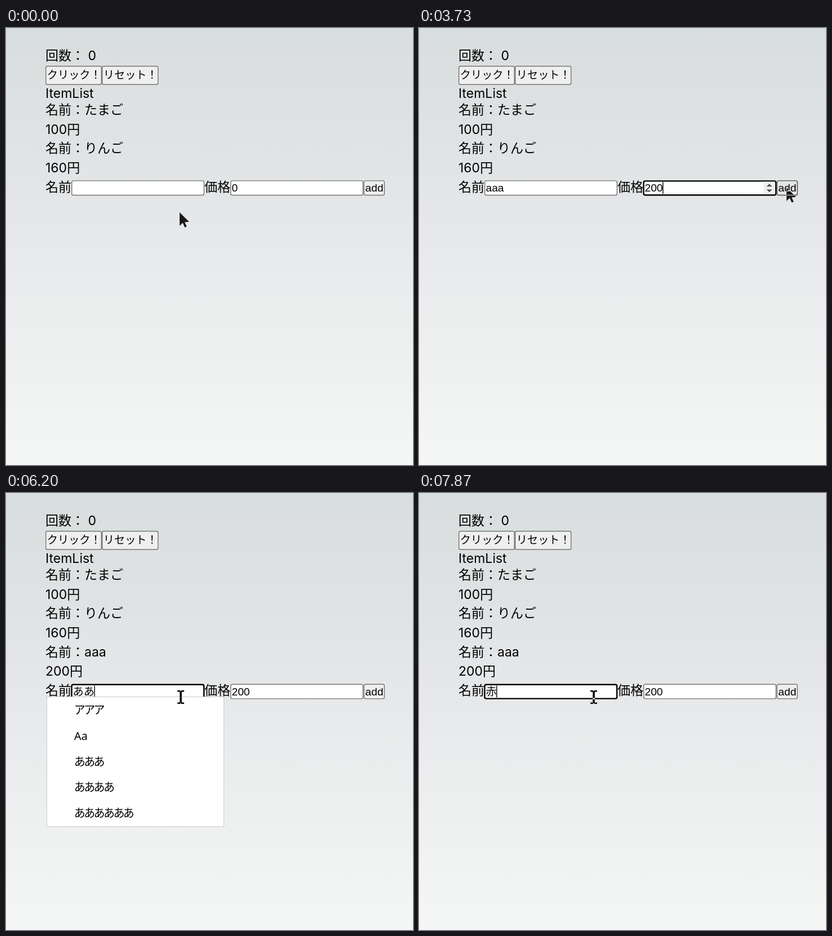
Write an HTML page with a canvas that moves like this. It is 722x775 px and loops after 8 s.

```html
<!DOCTYPE html>
<html lang="ja">
<head>
<meta charset="utf-8">
<title>ItemList</title>
<style>
  html, body { margin: 0; width: 100%; height: 100%; overflow: hidden; }
  canvas { display: block; }
</style>
</head>
<body>
<canvas id="stage" width="722" height="775"></canvas>
<script>
const ctx = document.getElementById('stage').getContext('2d');
const LOOP = 8000, STEP = 1000 / 15;
const KANA = "'Noto Sans CJK JP DemiLight', 'Noto Sans CJK JP Light', 'Noto Sans CJK JP', 'Noto Sans CJK', sans-serif";
const PAGE_FONT = "23px Inter, " + KANA;
const FIELD_FONT = "19.2px 'Liberation Sans', " + KANA;
const MENU_FONT = "20px 'Noto Sans', " + KANA;

// Pointer hot spot: time, x, y
const path = [
  [0, 308, 327], [133, 300, 321], [333, 252, 294], [533, 236, 282],
  [3133, 236, 282], [3267, 256, 290], [3400, 400, 306], [3533, 570, 300], [3733, 652, 283],
  [4200, 652, 283], [4333, 590, 300], [4533, 367, 337], [4667, 322, 354], [4800, 310, 362],
  [LOOP, 310, 362]
];

const nameText = [
  [0, ''], [1600, 'a'], [1730, 'aa'], [1930, 'aaa'], [6000, 'あ'], [6130, 'ああ'],
  [6330, 'あああ'], [6730, 'ああ'], [6800, 'あ'], [7070, 'あｋ'], [7130, 'あか'], [7330, '赤']
];
const priceText = [[0, '0'], [2470, '2'], [2530, '20'], [2670, '200']];
const focus = [[0, ''], [930, 'name'], [2130, 'price'], [3930, ''], [5000, 'name']];
const selected = [[0, false], [2130, true], [2470, false], [5470, true], [6000, false]];
const caretOn = [
  [0, true], [1470, false], [1600, true], [3200, false], [3730, true], [6730, false], [6800, true]
];
const underline = [[0, ''], [6000, 'wave'], [7330, 'bar'], [7870, '']];

const kanaMenu = { right: 387, items: ['アアア', 'Aa', 'あああ', 'ああああ', 'ああああああ'] };
const shortMenu = { right: 395, items: ['ありがとうございます', 'あ', 'ある', 'あと', 'あり'] };
const redMenu = { right: 395, items: ['赤', '明るい', '赤い', 'あかり', 'アカ'] };
const menu = [[0, null], [6200, kanaMenu], [6800, shortMenu], [7200, redMenu], [7330, null]];

const at = (list, t) => list.findLast(entry => entry[0] <= t)[1];

function pointerAt(t) {
  const time = Math.floor((t + 4) / STEP) * STEP;
  const i = Math.max(1, path.findIndex(p => p[0] > time));
  const [a, b] = [path[i - 1], path[i]];
  const k = (time - a[0]) / (b[0] - a[0]);
  return [a[1] + (b[1] - a[1]) * k, a[2] + (b[2] - a[2]) * k];
}

function text(str, x, y, font, color = '#000') {
  ctx.font = font;
  ctx.fillStyle = color;
  ctx.fillText(str, x, y);
}

function rect(x, y, w, h, color) {
  ctx.fillStyle = color;
  ctx.fillRect(x, y, w, h);
}

function box(x, y, w, h, fill, border, line) {
  ctx.beginPath();
  ctx.roundRect(x + line / 2, y + line / 2, w - line, h - line, 2.8);
  ctx.fillStyle = fill;
  ctx.fill();
  ctx.strokeStyle = border;
  ctx.lineWidth = line;
  ctx.stroke();
}

function polygon(points, x, y, scale) {
  ctx.beginPath();
  for (const [px, py] of points) ctx.lineTo(x + px * scale, y + py * scale);
  ctx.fill();
}

const inside = ([px, py], x, y, w, h) => px >= x && px < x + w && py >= y && py < y + h;

function button(label, x, y, w, h, base, fill = '#efefef', border = '#767676') {
  box(x, y, w, h, fill, border, 1.4);
  text(label, x + 2.8, base, FIELD_FONT);
}

function spinner(x, y) {
  rect(x, y + 2.5, 20, 21.5, '#efefef');
  ctx.fillStyle = '#505050';
  polygon([[-5, 0], [0, -5], [5, 0]], x + 10.5, y + 11, 1);
  polygon([[-5, 0], [0, 5], [5, 0]], x + 10.5, y + 16, 1);
}

function field(x, y, value, focused, hovered, t) {
  if (focused) box(x - 0.7, y, 237, 27.2, '#fff', '#000', 2.4);
  else box(x, y, 236, 27, '#fff', hovered ? '#4f4f4f' : '#767676', 1.4);
  ctx.font = FIELD_FONT;
  const width = ctx.measureText(value).width;
  const highlight = focused && at(selected, t);
  if (highlight) rect(x + 2.5, y + 3, width, 21, '#0078d7');
  text(value, x + 2.5, y + 20, FIELD_FONT, highlight ? '#fff' : '#000');
  if (focused && !highlight && at(caretOn, t)) rect(x + 2.5 + width - 0.5, y + 3, 1.4, 21, '#000');
  return width;
}

function compositionLine(kind, x, y, width) {
  if (kind === 'bar') rect(x, y - 2, width, 2, '#000');
  if (kind !== 'wave') return;
  ctx.beginPath();
  for (let i = 0; i <= width; i += 0.5) ctx.lineTo(x + i, y + Math.sin(i * 1.57));
  ctx.strokeStyle = '#222';
  ctx.lineWidth = 1;
  ctx.stroke();
}

function popup({ right, items }) {
  rect(72, 361, right - 72, 231, '#c8cbcc');
  rect(73, 362, right - 74, 229, '#fff');
  items.forEach((item, i) => {
    ctx.letterSpacing = item === 'Aa' ? '0px' : '-2.6px';
    text(item, 120.8, 392.4 + i * 45.6, MENU_FONT);
  });
  ctx.letterSpacing = '0px';
}

// The pointer inverts whatever lies beneath it.
function drawPointer([x, y], beam) {
  ctx.globalCompositeOperation = 'difference';
  ctx.fillStyle = '#fff';
  if (beam) {
    ctx.beginPath();
    for (const side of [-12, 9.5]) {
      ctx.rect(x - 6, y + side, 5.2, 2.5);
      ctx.rect(x + 0.8, y + side, 5.2, 2.5);
    }
    ctx.rect(x - 1.8, y - 10.8, 3.6, 21.6);
    ctx.fill();
  } else {
    polygon([[0, 0], [0, 17], [4, 13.2], [6.5, 19], [9, 18], [6.5, 12.3], [12, 12]], x, y, 1.4);
  }
  ctx.globalCompositeOperation = 'source-over';
}

function background() {
  const g = ctx.createLinearGradient(0, 0, 0, 775);
  g.addColorStop(0, '#d8dddd');
  g.addColorStop(0.4, '#e4e6e8');
  g.addColorStop(1, '#f5f7f6');
  rect(0, 0, 722, 775, g);
}

function draw(t) {
  const pointer = pointerAt(t);
  const added = t >= 4200;
  const y = added ? 338.6 : 270.2;
  const active = at(focus, t);

  background();
  text('回数： 0', 70, 57, PAGE_FONT);
  button('クリック！', 70, 67, 100, 34, 90);
  button('リセット！', 170, 67, 100.4, 34, 90);
  text('ItemList', 70, 123.5, PAGE_FONT);

  const items = [['たまご', 100], ['りんご', 160]];
  if (added) items.push(['aaa', 200]);
  items.forEach(([name, price], i) => {
    text('名前：' + name, 70, 153 + i * 68.4, PAGE_FONT);
    text(price + '円', 70, 187.5 + i * 68.4, PAGE_FONT);
  });

  const overName = inside(pointer, 116, y, 236, 27);
  const overPrice = inside(pointer, 398, y, 236, 27);
  const overAdd = inside(pointer, 634.5, y, 37.5, 27);
  text('名前', 70, y + 19.8, PAGE_FONT);
  text('価格', 352, y + 19.8, PAGE_FONT);
  const width = field(116, y, at(nameText, t), active === 'name', overName, t);
  compositionLine(at(underline, t), 118.5, y + 23.5, width - 0.5);
  field(398, y, at(priceText, t), active === 'price', overPrice, t);
  if (active === 'price' || overPrice) spinner(611, y);
  const addFill = !overAdd ? '#efefef' : t >= 3930 ? '#f5f5f5' : '#e5e5e5';
  button('add', 634.5, y, 37.5, 27, y + 20, addFill, overAdd ? '#4f4f4f' : '#767676');

  const candidates = at(menu, t);
  if (candidates) popup(candidates);
  drawPointer(pointer, overName || overPrice);
}

function tick() {
  draw(performance.now() % LOOP);
  requestAnimationFrame(tick);
}
tick();
</script>
</body>
</html>
```
